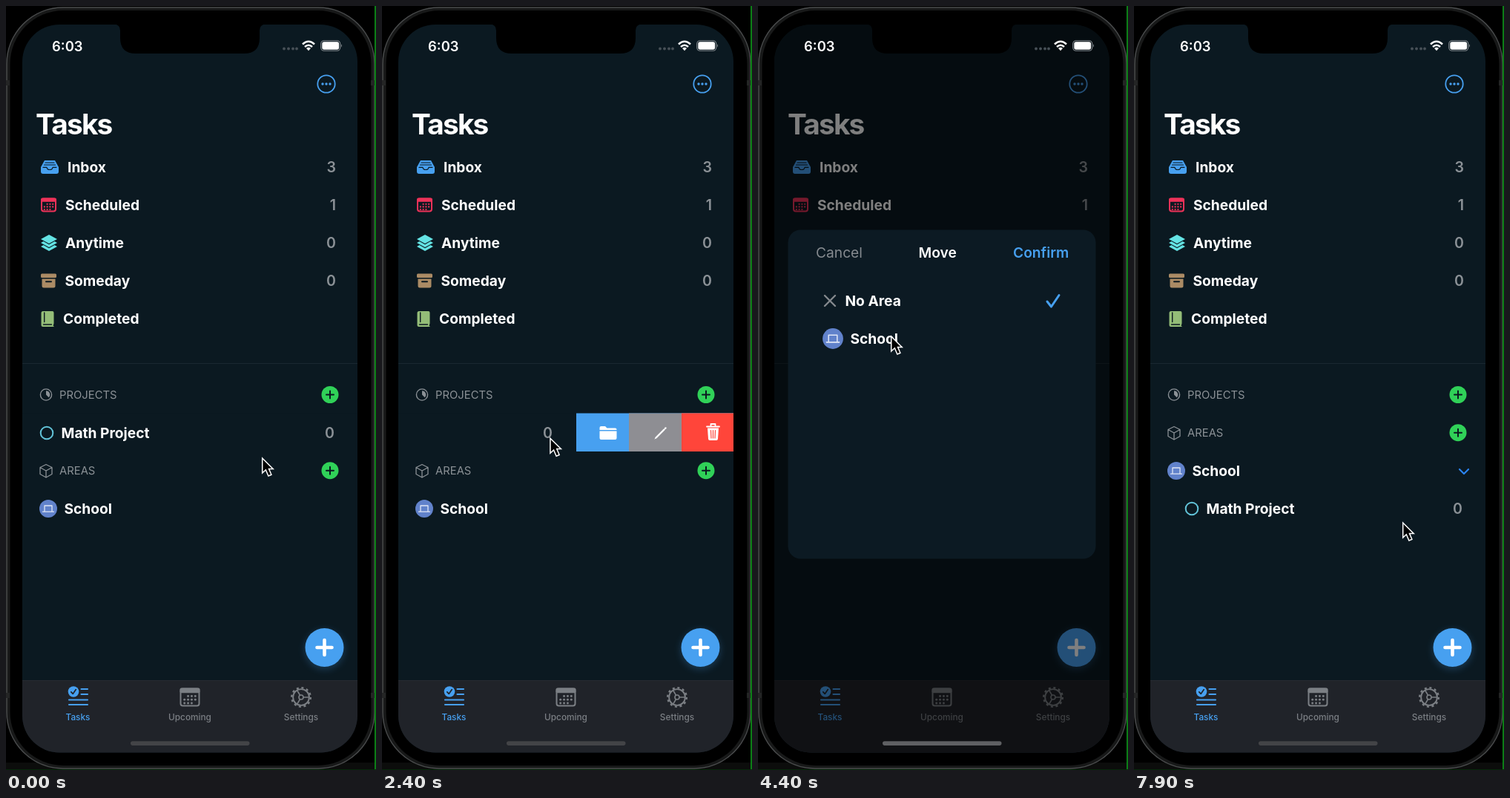
Animation of 499x1029 px, one loop 8 s. Source, as an HTML page:

```html
<!DOCTYPE html>
<html lang="en">
<head>
<meta charset="utf-8">
<title>Tasks</title>
<style>
html, body { margin: 0; width: 100%; height: 100%; overflow: hidden; background: #000; }
svg { display: block; width: 100vw; height: 100vh; }
text { font-family: Inter, Roboto, "Liberation Sans", sans-serif; white-space: pre; }
</style>
</head>
<body>
<svg id="stage" viewBox="0 0 499 1029"></svg>
<script>
const BG = '#0b1921', BLUE = '#47a0f0', GRAY = '#8b9196', TAB = '#7b7f84';
const LOOP = 8000, STEP = 100;

// Markup helpers
const text = (x, y, str, fill = '#fff', size = 19.2, weight = 700, extra = '') =>
  `<text x="${x}" y="${y}" fill="${fill}" font-size="${size}" font-weight="${weight}" ${extra}>${str}</text>`;
const rect = (x, y, w, h, fill, r = 0, extra = '') =>
  `<rect x="${x}" y="${y}" width="${w}" height="${h}" rx="${r}" fill="${fill}" ${extra}/>`;
const circle = (x, y, r, fill, extra = '') =>
  `<circle cx="${x}" cy="${y}" r="${r}" fill="${fill}" ${extra}/>`;
const line = (d, color, width = 2, extra = '') =>
  `<path d="${d}" fill="none" stroke="${color}" stroke-width="${width}" stroke-linecap="round" stroke-linejoin="round" ${extra}/>`;
const shape = (d, fill, extra = '') => `<path d="${d}" fill="${fill}" ${extra}/>`;
const group = (id, body) => `<g id="${id}">${body}</g>`;
const at = (x, y, body, scale = 1) => `<g transform="translate(${x} ${y}) scale(${scale})">${body}</g>`;

const count = (y, n, x = 445) => text(x, y, n, GRAY, 19.6, 600, 'text-anchor="end"');

function calendar(x, y, w, h, color) {
  let dots = '';
  const dx = w * .18, dy = h * .19;
  for (let row = 0; row < 3; row++)
    for (let col = 0; col < 4; col++)
      if (!(row === 0 && col === 0) && !(row === 2 && col === 3))
        dots += circle((col - 1.5) * dx, h * .13 + (row - 1) * dy, w * .055, color);
  return at(x, y, rect(-w / 2 + 1, -h / 2 + 1, w - 2, h - 2, 'none', 3, `stroke="${color}" stroke-width="2"`) +
    rect(-w / 2, -h / 2, w, h * .27, color, 2) + dots);
}

const addButton = y => circle(437, y, 11.5, '#30d158') + line(`M432 ${y}h10M437 ${y - 5}v10`, BG);
const ring = (x, y) => circle(x, y, 8.3, 'none', 'stroke="#62c3d8" stroke-width="2"');
const laptop = (x, y, s = 1) => at(x, y, circle(0, 0, 12, '#6182cb') +
  line('M-5 3.2V-4H5V3.2M-7.5 4.2H7.5', '#dfe6f6', 1.3), s);

const listIcons =
  at(59, 217, shape('M-7-9H7L12 0V6Q12 9 9 9H-9Q-12 9-12 6V0Z', BLUE) +
    line('M-6-6H6M-7.5-3H7.5M-9 .3H-4Q-3.5 3.5 0 3.5T4 .3H9', BG, 1.2)) +
  calendar(57.5, 268, 21, 19, '#ee3259') +
  at(58, 319, shape('M0-11L11-5L0 1L-11-5Z', '#64e3e4') +
    shape('M-11 0L-7.5-2L0 2.2L7.5-2L11 0L0 6Z', '#64e3e4') +
    shape('M-11 5L-7.5 3L0 7.2L7.5 3L11 5L0 11Z', '#64e3e4')) +
  at(57.5, 370, rect(-10.5, -9.5, 21, 5.5, '#ab8b65', 1.5) +
    shape('M-9-2.5H9V7Q9 9.5 6.5 9.5H-6.5Q-9 9.5-9 7Z', '#ab8b65') + line('M-3.5 1.2H3.5', BG, 2)) +
  at(56, 421.5, shape('M-8.5 8V-8Q-8.5-10.5-6-10.5H6.5Q8.5-10.5 8.5-8.5V6L7.5 9.5H8.5V10.5H-6Q-8.5 10.5-8.5 8Z', '#94bd78') +
    line('M-4.3-8.5V4M-5.5 7.5H5.5', BG, 1.4));

const lists = [['Inbox', 83, 3], ['Scheduled', 80, 1], ['Anytime', 80, 0], ['Someday', 79.5, 0], ['Completed', 77, '']]
  .map(([name, x, n], i) => text(x, 224 + 51.1 * i, name) + count(224 + 51.1 * i, n)).join('');

const header =
  circle(432, 105, 11.7, 'none', `stroke="${BLUE}" stroke-width="1.8"`) +
  [-5, 0, 5].map(d => circle(432 + d, 105, 1.7, BLUE)).join('') +
  text(40, 173, 'Tasks', '#fff', 38.8, 700, 'letter-spacing="-1.8"');

const projects =
  rect(22, 481, 452, 1, '#1a2831') +
  circle(54, 523.5, 7.6, 'none', `stroke="${GRAY}" stroke-width="1.4"`) +
  shape('M54 518.2A5.3 5.3 0 0 1 57.7 527.2L54 523.5Z', GRAY) +
  text(72, 529, 'PROJECTS', GRAY, 14.8, 400) + addButton(523.5);

const areas =
  line('M54 617.5L62 621.5V630.5L54 635L46 630.5V621.5ZM46 621.5L54 626L62 621.5M54 626V635', GRAY, 1.3) +
  text(72, 631, 'AREAS', GRAY, 14.8, 400) + addButton(625.7) +
  laptop(57, 677) + text(78.5, 684, 'School') +
  group('chevron', line('M-3-6L3 0L-3 6', '#2b83f0', 2.2));

const folder = at(305, 575, shape('M-11.5-7Q-11.5-9-9.5-9H-4L-1.5-6.5H9.5Q11.5-6.5 11.5-4.5V-4H-11.5ZM-11.5-2.5H11.5V7Q11.5 9 9.5 9H-9.5Q-11.5 9-11.5 7Z', '#fff'));
const pencil = at(375.5, 575, line('M-6 6.5L5 -4.5', '#fff', 2.4) + line('M6.6-6.2L7-6.6', '#fff', 2.4) + line('M-7.5 8L-6 6.5', '#fff', 1));
const trash = at(446.5, 574, line('M-8.5-7.5H8.5M-3-8V-11H3V-8', '#fff', 1.8) +
  shape('M-7.5-5.5H7.5L6.5 9Q6.3 11 4.5 11H-4.5Q-6.3 11-6.5 9Z', '#fff') + line('M-3-2.5L-2.5 8M0-2.5V8M3-2.5L2.5 8', '#ff453a', 1.2));
const actions = [[262, BLUE, folder], [333, '#8e8e93', pencil], [404, '#ff453a', trash]]
  .map(([x, fill, icon], i) => group('action' + i, rect(x, 548.5, 214, 51.5, fill) + icon)).join('');

const gear = at(398, 931,
  circle(0, 0, 12.8, 'none', `stroke="${TAB}" stroke-width="2.4" stroke-dasharray="3 3.702"`) +
  circle(0, 0, 10.9, 'none', `stroke="${TAB}" stroke-width="1.9"`) +
  circle(0, 0, 3, 'none', `stroke="${TAB}" stroke-width="1.6"`) +
  line('M3.2 0H10M-1.6-2.8L-5-8.7M-1.6 2.8L-5 8.7', TAB, 1.7));

const tabLabel = (x, name, fill) => text(x, 961.5, name, fill, 11.8, 500, 'text-anchor="middle"');
const tabBar = rect(22, 908, 452, 98, '#202329') + rect(22, 908, 452, 1, '#272b31') +
  circle(91, 923.5, 7.3, BLUE) + line('M87.8 923.8L90.2 926.4L94.3 920.6', '#202329', 1.7) +
  line('M101.5 920H110M101.5 927H110M85 934.5H110M85 941H110', BLUE, 2.1) +
  calendar(248, 931, 27, 25, TAB) + gear +
  tabLabel(97, 'Tasks', BLUE) + tabLabel(248, 'Upcoming', TAB) + tabLabel(398, 'Settings', TAB);

const fab = circle(429.5, 867, 27, BLUE, 'opacity=".22" filter="url(#blur)"') +
  circle(429.5, 864, 26, BLUE) + line('M419.5 864H439.5M429.5 854V874', '#fff', 4.6);

const modal = rect(40.5, 301.5, 415, 443, '#0c1a23', 17) +
  text(78, 338.5, 'Cancel', '#868b90', 19.2, 400) + text(216.5, 338.5, 'Move', '#fff', 19.2, 600) +
  text(344, 338.5, 'Confirm', BLUE, 19.2, 600) +
  line('M90 390L104 404M104 390L90 404', '#85898d', 2.4) + text(117.5, 404, 'No Area') +
  laptop(101, 448, 1.16) + text(124.5, 455, 'School') +
  group('check', line('M390 398L395.5 405L406 389.5', BLUE, 3));

const status = text(62, 60.5, '6:03', '#fff', 18.4, 600) +
  [375, 381, 387, 392].map(x => circle(x, 57.5, 1.9, '#475057')).join('') +
  line('M400 51.5Q408 44 416 51.5M403 55Q408 50.5 413 55', '#fff', 2.5, 'style="stroke-linecap:butt"') +
  shape('M405 57Q408 54.4 411 57L408 60.3Z', '#fff') +
  rect(424.7, 46.7, 26, 13.6, 'none', 4.2, 'stroke="#848b90" stroke-width="1.1"') +
  rect(426.3, 48.3, 22.8, 10.4, '#fff', 2.7) + shape('M452 51.3Q454 53.5 452 55.7Z', '#848b90');

const phone = rect(0, 1019, 499, 10, '#0c0d0c') +
  rect(1, 2, 496, 1025, '#181919', 76, 'stroke="#4b4d4e" stroke-width="1.5"') +
  rect(5.5, 6, 487, 1017, '#000', 72) +
  [100, 925].map(y => rect(0, y, 5, 7, '#242525') + rect(492, y, 5, 7, '#242525')).join('') +
  rect(497, 0, 2, 1029, '#0c7d16') + rect(0, 1028, 499, 1, '#06280a');

document.getElementById('stage').innerHTML =
  `<defs><clipPath id="screen">${rect(22, 25, 452, 980.5, '#000', 50)}</clipPath>
  <filter id="blur" x="-50%" y="-50%" width="200%" height="200%"><feGaussianBlur stdDeviation="5"/></filter></defs>` +
  phone + `<g clip-path="url(#screen)">` + rect(22, 25, 452, 981, BG) + header + listIcons + lists + projects +
  group('areas', areas) +
  group('project', rect(22, 548.5, 452, 51.5, BG) +
    group('slider', ring(55, 575) + text(74.5, 582, 'Math Project') + count(582, 0, 443)) + actions) +
  group('child', ring(78, 677) + text(97.5, 684, 'Math Project') + count(684, 0, 443)) +
  tabBar + fab + group('dim', rect(22, 25, 452, 981, '#000')) + `</g>` +
  shape('M146 24.5Q154 25 154 33V43Q154 64 175 64H321Q342 64 342 43V33Q342 25 350 24.5Z', '#000') +
  status + rect(168, 990.3, 160.5, 5.6, '#424449', 2.8, 'id="home"') +
  group('modal', modal) +
  circle(0, 0, 23.8, '#d2d2d2', 'id="touch" opacity=".8"') +
  group('cursor', shape('M.7 1V21L5.3 16.8L8.9 25L12.9 23.3L9.5 15.4H15.2Z', '#000', 'stroke="#fff" stroke-width="1.5"'));

// Motion helpers
const smooth = (t, from, to) => {
  const p = Math.min(1, Math.max(0, (t - from) / (to - from)));
  return p * p * (3 - 2 * p);
};
const mix = (a, b, p) => a + (b - a) * p;
const within = (t, from, to) => t >= from && t < to;

const cursorPath = [
  [0, 345, 608], [1000, 366, 581], [1500, 366, 581], [2100, 226, 583], [2300, 222, 582],
  [2900, 279, 571], [3500, 279, 571], [4300, 179, 444], [4800, 179, 444], [5300, 375, 332],
  [5800, 375, 332], [6700, 444, 620], [7400, 444, 620], [7900, 362, 695]
];
function cursorAt(t) {
  const i = Math.max(1, cursorPath.findIndex(k => k[0] >= t));
  const [t0, x0, y0] = cursorPath[i - 1], [t1, x1, y1] = cursorPath[i];
  const p = smooth(t, t0, t1);
  return [mix(x0, x1, p), mix(y0, y1, p)];
}

// The row follows the drag, snaps open, then closes behind the sheet
function swipeAt(t, cursorX) {
  if (t < 1500) return 0;
  if (t < 2100) return Math.max(0, 361 - cursorX);
  return mix(135, 213, smooth(t, 2100, 2400)) * (1 - smooth(t, 3300, 3700));
}

const el = id => document.getElementById(id);
const set = (id, attrs) => { for (const name in attrs) el(id).setAttribute(name, attrs[name]); };
const move = (id, x, y, rest = '') => set(id, { transform: `translate(${x} ${y}) ${rest}` });

const taps = [[1400, 2100], [3000, 3200], [4500, 4700], [5300, 5500], [7100, 7200]];

function draw(t) {
  const [x, y] = cursorAt(t);
  move('cursor', x, y);
  move('touch', x + 8, y + 1);
  set('touch', { visibility: taps.some(([a, b]) => within(t, a, b)) ? 'visible' : 'hidden' });

  const swipe = swipeAt(t, x);
  move('slider', -swipe, 0);
  for (let i = 0; i < 3; i++) move('action' + i, (213 - swipe) * (1 - i / 3), 0);
  set('project', { opacity: 1 - smooth(t, 5500, 5950) });

  move('areas', 0, -51 * smooth(t, 5500, 5970));
  const opened = smooth(t, 7100, 7400);
  move('chevron', 446 - opened, 677 + opened, `rotate(${90 * opened})`);
  set('chevron', { opacity: t < 5500 ? 0 : 1 });
  set('child', { opacity: smooth(t, 7200, 7500) });
  move('child', 0, -20 * (1 - opened));

  const shade = smooth(t, 3200, 3600) - smooth(t, 5500, 6150);
  set('dim', { opacity: .5 * shade });
  const glow = .4 * smooth(t, 3200, 3600) + .6 * smooth(t, 5400, 5700) - smooth(t, 5800, 6300);
  const tone = Math.round(mix(67, 138, glow));
  set('home', { fill: `rgb(${tone},${tone + 1},${tone + 4})` });

  const shown = smooth(t, 3300, 3700);
  const scale = mix(.75, 1, shown) - .75 * smooth(t, 5500, 6000);
  move('modal', 248 * (1 - scale), 523 * (1 - scale), `scale(${scale})`);
  set('modal', { opacity: shown - smooth(t, 5500, 6050) });
  move('check', 0, within(t, 4700, 5500) ? 51 : 0);
}

function tick() {
  const t = performance.now() % LOOP;
  draw(Math.floor(t / STEP) * STEP);
  requestAnimationFrame(tick);
}
tick();
</script>
</body>
</html>
```
